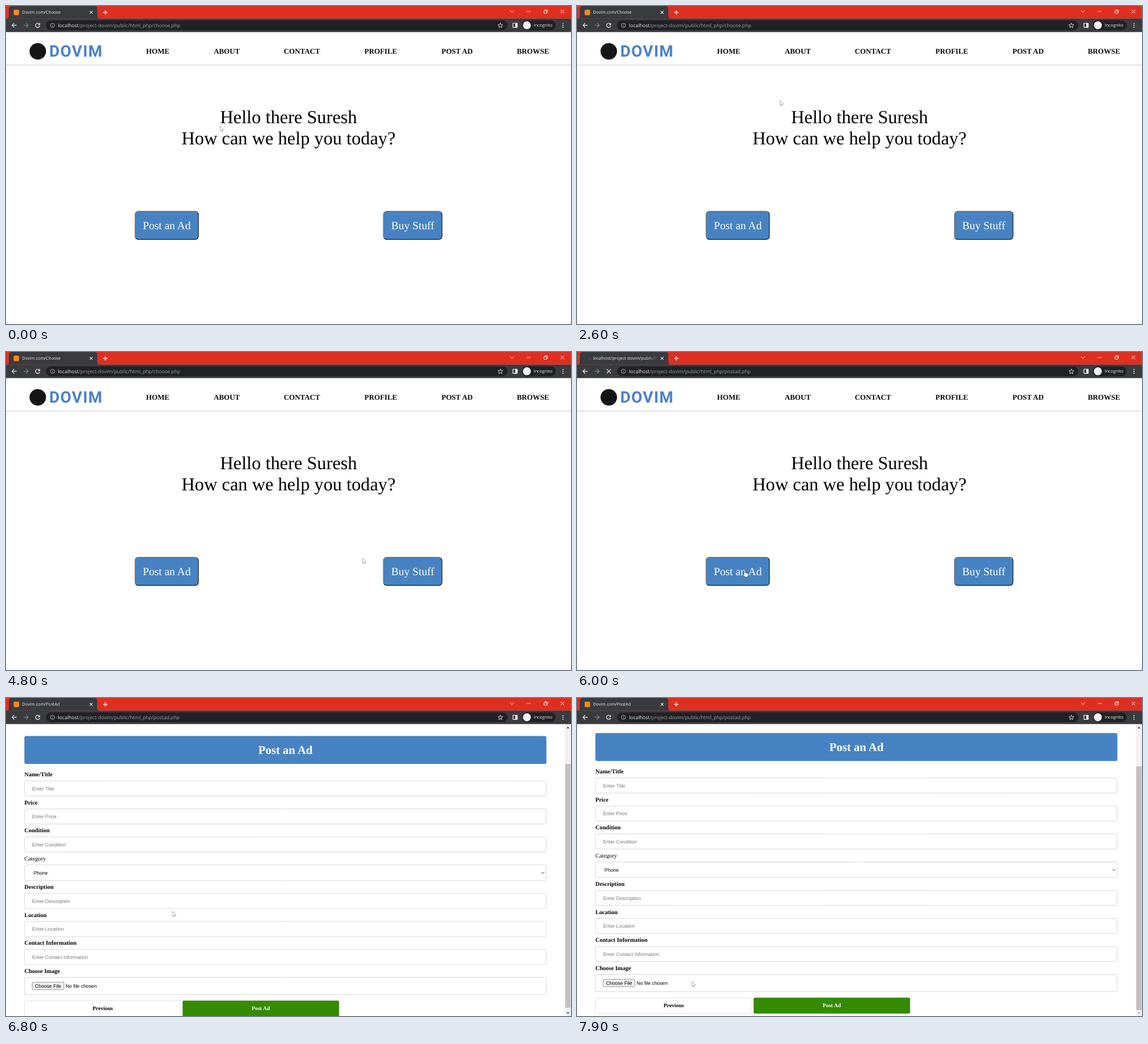
An HTML page with a canvas for the animation above (8000 ms loop, 960 px wide and 540 px high).

```html
<!DOCTYPE html>
<html lang="en">
<head>
<meta charset="utf-8">
<title>Classifieds walkthrough</title>
<style>
  html, body { margin: 0; width: 100%; height: 100%; overflow: hidden; background: #fff; }
  canvas { display: block; width: 100vw; height: 100vh; }
</style>
</head>
<body>
<canvas id="stage" width="960" height="540"></canvas>
<script>
const ctx = document.getElementById('stage').getContext('2d');
const LOOP = 8000, STEP = 100;
const NAV_AT = 5900, PAGE_AT = 6200, ICON_AT = 6400;
const SERIF = '"Liberation Serif", "Times New Roman", serif';
const SANS = '"Liberation Sans", Arial, sans-serif';
const UI = '"Open Sans", "Noto Sans", sans-serif';
const BLUE = '#4783c2', BAR = '#3a3b3f', FIELD = '#202124';
const NAV = ['HOME', 'ABOUT', 'CONTACT', 'PROFILE', 'POST AD', 'BROWSE'];
const FIELDS = ['Name/Title', 'Price', 'Condition', 'Category', 'Description',
  'Location', 'Contact Information', 'Choose Image'];
const HOST = 'localhost', DIR = '/project-dovim/public/html_php/';

// Pointer path: tenths of a second, x, y
const PATH = [
  [0, 364, 204], [4, 364, 204], [5, 372, 170], [6, 386, 112], [8, 401, 34],
  [16, 401, 34], [18, 455, 8], [20, 488, 50], [22, 436, 140], [24, 380, 178],
  [26, 345, 160], [28, 314, 176], [30, 335, 194], [32, 372, 170], [35, 431, 150],
  [37, 472, 186], [39, 440, 232], [42, 400, 250], [44, 560, 290], [47, 732, 360],
  [49, 480, 340], [51, 289, 362], [53, 285, 371], [61, 285, 371], [65, 283, 362],
  [76, 283, 362], [77, 265, 392], [78, 222, 448], [79, 195.5, 481]
];

function text(str, x, y, font, color, align = 'left') {
  ctx.font = font;
  ctx.fillStyle = color;
  ctx.textAlign = align;
  ctx.fillText(str, x, y);
}

function rect(x, y, w, h, color) {
  ctx.fillStyle = color;
  ctx.fillRect(x, y, w, h);
}

function box(x, y, w, h, r, fill, stroke, lw = 0.7) {
  ctx.beginPath();
  ctx.roundRect(x, y, w, h, r);
  if (fill) { ctx.fillStyle = fill; ctx.fill(); }
  if (stroke) { ctx.strokeStyle = stroke; ctx.lineWidth = lw; ctx.stroke(); }
}

function disc(x, y, r, color) {
  ctx.fillStyle = color;
  ctx.beginPath();
  ctx.arc(x, y, r, 0, 7);
  ctx.fill();
}

function draw(d, x, y, stroke, lw = 1, fill) {
  const p = new Path2D(d);
  ctx.save();
  ctx.translate(x, y);
  if (fill) { ctx.fillStyle = fill; ctx.fill(p); }
  if (stroke) { ctx.strokeStyle = stroke; ctx.lineWidth = lw; ctx.stroke(p); }
  ctx.restore();
}

function header(logoX, navX) {
  disc(logoX + 14.5, 77, 14, '#151515');
  ctx.letterSpacing = '1.2px';
  text('DOVIM', logoX + 34, 85.5, 'bold 27px Roboto, sans-serif', '#4a80c8');
  ctx.letterSpacing = '0px';
  NAV.forEach((s, i) => text(s, navX[i], 81.3, `bold 12.5px ${SERIF}`, '#0a0a0a'));
}

function bigButton(x, w, label) {
  const y = 348.3, h = 48.7;
  box(x, y, w, h, 6, '#191f26');
  ctx.save();
  ctx.beginPath();
  ctx.moveTo(x, y + h);
  ctx.lineTo(x, y);
  ctx.lineTo(x + w, y);
  ctx.lineTo(x + w - 6, y + 6);
  ctx.lineTo(x + 6, y + h - 6);
  ctx.clip();
  box(x, y, w, h, 6, '#767a80');
  ctx.restore();
  box(x + 1.25, y + 1.25, w - 2.5, h - 2.5, 4.8, BLUE);
  text(label, x + w / 2, 379, `18.75px ${SERIF}`, '#fff', 'center');
}

function choosePage() {
  header(39.5, [238, 353, 472, 609, 740, 868]);
  rect(0, 99.8, 960, 1, '#c9c9cb');
  const font = `31.25px ${SERIF}`;
  text('Hello there Suresh', 480, 198.5, font, '#000', 'center');
  text('How can we help you today?', 480, 234.5, font, '#000', 'center');
  bigButton(218.8, 108.7, 'Post an Ad');
  bigButton(640.8, 100.6, 'Buy Stuff');
}

function formRow(name, i) {
  const y = 209.2 + 47.55 * i + (i > 3 ? 0.8 : 0);
  const font = `8.33px ${SANS}`;
  const weight = name === 'Category' ? '' : 'bold ';
  text(name, 31.3, y - 7.6, `${weight}10px ${SERIF}`, '#000');
  const h = i === 7 ? 29.2 : i === 3 ? 26.5 : 25.6;
  box(31.4, y, 886.4, h, 2.5, '#fff', '#c9c9c9');
  if (i === 3) {
    text('Phone', 46.8, y + 16.5, font, '#000');
    draw('M-2.4 -1.2 L0 1.2 L2.4 -1.2', 912.2, y + 13.4, '#333', 1);
  } else if (i === 7) {
    box(44.5, y + 8.2, 54, 12.6, 1.5, '#efefef', '#767676');
    text('Choose File', 49.3, y + 17.6, font, '#000');
    text('No file chosen', 101.3, y + 17.6, font, '#000');
  } else {
    text('Enter ' + name.replace('Name/', ''), 44.4, y + 15.7, font, '#777');
  }
}

function scrollbar(scroll) {
  rect(949.5, 44, 10.5, 496, '#f1f1f1');
  rect(950.2, 55 + scroll * 0.832, 9.2, 414, '#c1c1c1');
  const on = '#505050', off = '#a8a8a8';
  draw('M-2.6 1.4 L0 -1.4 L2.6 1.4Z', 954.8, 50, null, 0, scroll ? on : off);
  draw('M-2.6 -1.4 L0 1.4 L2.6 -1.4Z', 954.8, 535.2, null, 0, scroll > 73 ? off : on);
}

function formPage(scroll) {
  ctx.save();
  ctx.translate(0, -scroll);
  header(38.7, [235.6, 349, 466.7, 602, 731.3, 857.8]);
  rect(0, 99.8, 949.5, 1, '#c9c9cb');
  box(31.2, 132.8, 887, 47.7, 3, BLUE);
  text('Post an Ad', 474.8, 163.4, `bold 20px ${SERIF}`, '#fff', 'center');
  FIELDS.forEach(formRow);
  const font = `bold 9.375px ${SERIF}`;
  box(31.4, 582.6, 266, 26.4, 2, '#fff', '#d6d6d6');
  box(300.2, 582.4, 265.6, 26.8, 2, '#348a00', '#5f9a3c', 0.6);
  text('Previous', 164.4, 598.8, font, '#000', 'center');
  text('Post Ad', 433, 598.8, font, '#fff', 'center');
  ctx.restore();
  scrollbar(scroll);
}

function tab(t) {
  draw('M0 21.5 Q5 21.5 5 16.5 V5 Q5 0 10 0 H150 Q155 0 155 5 V16.5 Q155 21.5 160 21.5Z',
    0, 0, null, 0, BAR);
  const loading = t >= NAV_AT && t < ICON_AT;
  if (loading) {
    const a = t / 160;
    ctx.strokeStyle = '#62656b';
    ctx.lineWidth = 0.9;
    ctx.beginPath();
    ctx.arc(17.5, 11, 4, a, a + 0.8);
    ctx.stroke();
  } else {
    box(13, 6.3, 9.2, 9.2, 1.5, '#f08a24');
  }
  const font = `7.2px ${UI}`;
  if (t >= NAV_AT && t < PAGE_AT) {
    const fade = ctx.createLinearGradient(120, 0, 137, 0);
    fade.addColorStop(0, '#e8eaed');
    fade.addColorStop(1, 'rgba(232,234,237,0)');
    text(HOST + DIR + 'postad.php', 27.2, 13.3, font, fade);
  } else {
    text('Dovim.com/' + (t < NAV_AT ? 'Choose' : 'PostAd'), 27.2, 13.3, font, '#e8eaed');
  }
  draw('M-2.4 -2.4 L2.4 2.4 M2.4 -2.4 L-2.4 2.4', 144.7, 10.8, '#f1f1f1', 1.1);
}

function browser(t) {
  const ink = '#e8eaed';
  rect(0, 0, 960, 21.5, '#df2f20');
  rect(0, 21.3, 960, 23, BAR);
  tab(t);
  draw('M-3.7 0 H3.7 M0 -3.7 V3.7', 168.8, 10.8, '#fff', 1.2);
  draw('M-3.2 -1.5 L0 1.6 L3.2 -1.5', 859.7, 9.3, '#fff', 0.9);
  draw('M-3.2 0 H3.2', 888, 9.3, '#fff', 0.9);
  draw('M-3 -1.5 H1.5 V3 H-3Z M-1.5 -1.5 V-3 H3 V1.5 H1.5', 917, 9.4, '#fff', 0.8);
  draw('M-3 -3 L3 3 M3 -3 L-3 3', 945.4, 9.4, '#fff', 0.9);

  const arrow = 'M4 0 H-3.6 M0 -3.8 L-3.8 0 L0 3.8';
  draw(arrow, 14, 32.7, ink, 1.2);
  ctx.save();
  ctx.scale(-1, 1);
  draw(arrow, -34, 32.7, '#85878b', 1.1);
  ctx.restore();
  if (t >= NAV_AT && t < ICON_AT) {
    draw('M-3.5 -3.5 L3.5 3.5 M3.5 -3.5 L-3.5 3.5', 54, 32.7, ink, 1.2);
  } else {
    draw('M3 -2 A3.6 3.6 0 1 0 3.5 1', 53.8, 32.8, ink, 1.2);
    draw('M4 -4.2 V-0.4 H0.2Z', 53.8, 32.8, null, 0, ink);
  }

  box(68, 24.5, 784, 16.6, 8.3, FIELD);
  draw('M3.6 0 A3.6 3.6 0 1 1 -3.6 0 A3.6 3.6 0 1 1 3.6 0 M0 -0.4 V2 M0 -2 V-1.1',
    78.9, 32.8, '#c4c7cb', 0.8);
  const font = `8.4px ${UI}`;
  text(HOST, 88.4, 35.8, font, ink);
  const hostWidth = ctx.measureText(HOST).width;
  text(DIR + (t < NAV_AT ? 'choose' : 'postad') + '.php', 88.4 + hostWidth, 35.8, font, '#9aa0a6');

  draw('M0 -4.2 L1.2 -1.4 L4.2 -1.2 L1.9 0.8 L2.6 3.8 L0 2.2 L-2.6 3.8 L-1.9 0.8 L-4.2 -1.2 L-1.2 -1.4Z',
    840, 33, ink, 0.8);
  box(861.3, 29.2, 7.4, 7.2, 0.6, null, '#fff', 1.1);
  rect(865.4, 29.2, 3.4, 7.2, '#fff');
  box(876.5, 24.5, 57.5, 16.6, 8.3, FIELD);
  disc(885, 32.8, 6.8, '#f3f4f5');
  text('Incognito', 896.6, 35.4, `7.3px ${UI}`, ink);
  for (const y of [29.6, 32.8, 36]) disc(946.4, y, 0.95, ink);
}

function pointerAt(t) {
  const s = t / 100;
  const i = PATH.findIndex(p => p[0] > s);
  if (i < 0) return PATH[PATH.length - 1].slice(1);
  const [t0, x0, y0] = PATH[i - 1], [t1, x1, y1] = PATH[i];
  const k = (s - t0) / (t1 - t0);
  return [x0 + (x1 - x0) * k, y0 + (y1 - y0) * k];
}

function pointer(t) {
  const [x, y] = pointerAt(t);
  const within = (l, top, r, b) => x > l && x < r && y > top && y < b;
  const first = t < PAGE_AT;
  if (first && (within(219, 348, 327, 397) || within(641, 348, 741, 397))) {
    draw('M-1 1 Q0 -0.8 1 1 V4 L5 5 Q6 5.4 5.8 7 L5 11 H0.2 L-2.4 7.2 Q-2.4 5.6 -1 6.8Z',
      x, y, '#333', 0.5, '#fff');
  } else if (within(68, 25, 852, 41) ||
      first && (within(365, 172, 595, 203) || within(299, 208, 661, 242))) {
    draw('M-2 -4.7 H-0.5 L0 -4.2 L0.5 -4.7 H2 M0 -4.2 V4.2 M-2 4.7 H-0.5 L0 4.2 L0.5 4.7 H2',
      x, y, '#000', 0.9);
  } else {
    draw('M0 0 V8.6 L1.9 6.9 L3.2 9.9 L4.6 9.3 L3.3 6.4 H5.8Z', x, y, '#858585', 0.65, '#fff');
  }
}

function scrollAt(t) {
  return t < 6800 ? 0 : 73.4 - 5 * Math.pow(0.25, (t - 6800) / 100);
}

function render(t) {
  rect(0, 0, 960, 540, '#fff');
  if (t < PAGE_AT) choosePage();
  else formPage(scrollAt(t));
  browser(t);
  pointer(t);
}

ctx.textRendering = 'geometricPrecision';
const start = performance.now();
function tick() {
  const t = (performance.now() - start) % LOOP;
  render(Math.floor(t / STEP) * STEP);
  requestAnimationFrame(tick);
}
tick();
</script>
</body>
</html>
```
